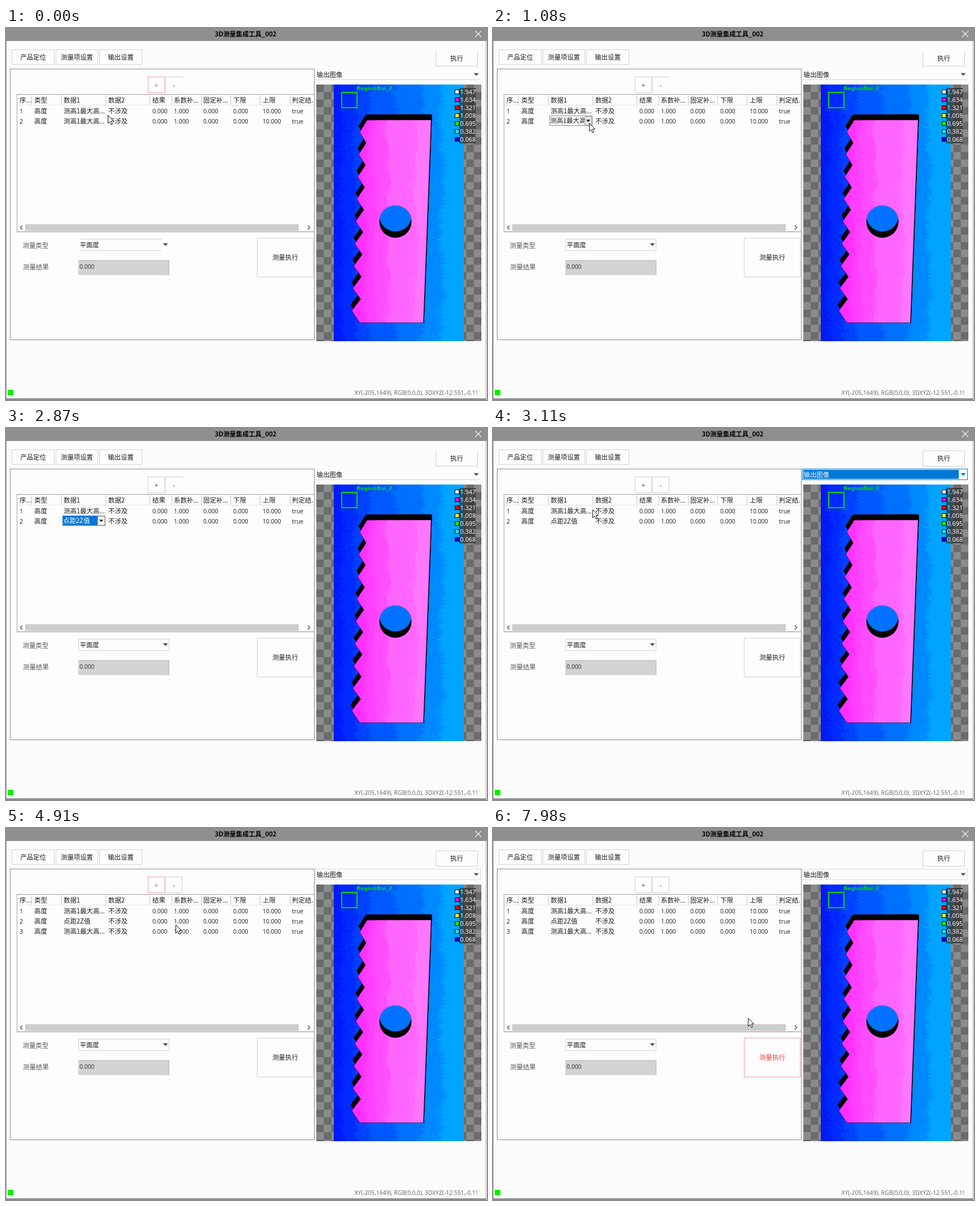
Write an HTML page with a canvas that moves like this. It is 851x658 px and loops after 8 s.

```html
<!DOCTYPE html>
<html lang="zh">
<head>
<meta charset="utf-8">
<style>
  html, body { margin: 0; width: 100%; height: 100%; overflow: hidden; background: #fcfcfc; }
  canvas { display: block; }
</style>
</head>
<body>
<canvas id="stage" width="851" height="658"></canvas>
<script>
const W = 851, H = 658, LOOP = 8000;
const CJK = '"Noto Sans CJK SC", "Noto Sans CJK", sans-serif';
const LATIN = '"Open Sans", "Noto Sans", sans-serif';
const INK = '#1c1c1c', BLUE = '#0078d7', RED = '#f23a3a', PINK = '#f2a3a3', EDGE = '#d2d2d2';
const stage = document.getElementById('stage').getContext('2d');

// Pointer stops: time, x, y; a stop without a place hides the pointer.
const pointerStops = [
  [0, 180, 154], [120, 178, 156], [270, 171, 160], [390, 165, 162], [510, 168, 163],
  [810, 170, 168], [1360, 167, 176], [1480, 160, 188], [1600, 157, 195], [1750],
  [2990, 166, 153], [3110, 176, 144], [3260, 198, 112], [3410, 240, 112],
  [3530, 265, 112], [3680, 268, 107], [3800, 271, 104], [3950, 272, 103],
  [4910, 300, 171], [5030, 327, 241], [5180, 352, 293], [5300, 378, 334],
  [5450, 425, 382], [5570, 462, 414], [5720, 477, 422], [5870, 494, 420],
  [6020, 497, 418], [6140, 498, 418], [7980, 451, 336]
];

const headers = ['序...', '类型', '数据1', '数据2', '结果', '系数补...', '固定补...', '下限', '上限', '判定结...'];
const columns = [24, 50, 102, 181, 259, 297, 349, 402, 454, 506];
const dividers = [45, 98, 176, 254, 293, 345, 397, 449, 502];

function seeded(seed) {
  return () => (seed = (seed * 16807) % 2147483647) / 2147483647;
}

function box(c, x, y, w, h, fill) {
  c.fillStyle = fill;
  c.fillRect(x, y, w, h);
}

function frame(c, x, y, w, h, color, fill) {
  if (fill) box(c, x, y, w, h, fill);
  c.strokeStyle = color;
  c.lineWidth = 1;
  c.strokeRect(x + .5, y + .5, w - 1, h - 1);
}

function clipped(c, x, y, w, h, paint) {
  c.save();
  c.beginPath();
  c.rect(x, y, w, h);
  c.clip();
  paint();
  c.restore();
}

function label(c, text, x, y, { color = INK, size = 11.4, align = 'left', weight = 400, family } = {}) {
  const latin = /^[\x20-\x7e]+$/.test(text);
  c.font = `${weight} ${latin ? size - 1 : size}px ${family || (latin ? LATIN : CJK)}`;
  c.textAlign = align;
  c.fillStyle = color;
  c.fillText(text, x, y + 4);
}

function polygon(c, points, dx = 0, dy = 0) {
  c.beginPath();
  points.forEach(([x, y]) => c.lineTo(x + dx, y + dy));
  c.closePath();
}

function disc(c, x, y, r) {
  c.beginPath();
  c.arc(x, y, r, 0, 2 * Math.PI);
}

function arrowDown(c, x, y, r, color) {
  polygon(c, [[x - r, y - r / 2], [x + r, y - r / 2], [x, y + r / 2 + .5]]);
  c.fillStyle = color;
  c.fill();
}

function chevron(c, x, y, dir) {
  c.strokeStyle = '#555';
  c.lineWidth = 1.4;
  c.beginPath();
  c.moveTo(x - 2 * dir, y - 3.5);
  c.lineTo(x + 1.5 * dir, y);
  c.lineTo(x - 2 * dir, y + 3.5);
  c.stroke();
}

function button(c, text, x, y, w, h, hot) {
  frame(c, x, y, w, h, hot ? PINK : EDGE, '#fdfdfd');
  label(c, text, x + w / 2, y + h / 2, { align: 'center', color: hot ? RED : INK });
}

// Vertical colour bands whose borders fray from row to row.
function bands(c, right, top, bottom, stops, fray, rnd) {
  for (let y = top; y < bottom; y++) {
    stops.forEach(([x, color], i) => {
      const sway = 3 * Math.sin(y / 31 + i * 2) + 2 * Math.sin(y / 9 + i);
      const left = i ? Math.round(x + sway + (rnd() - .5) * fray) : x;
      box(c, left, y, right - left, 1, color);
      if (i && rnd() < .5) box(c, Math.round(left - 4 - rnd() * fray), y, 1 + Math.round(rnd() * 2), 1, color);
    });
  }
}

function plateOutline() {
  const points = [[753, 163], [739, 521], [626, 521]];
  for (let i = 8; i >= 0; i--) {
    const y = 184 + i * 39.5;
    points.push([626 - i * 1.75, y], [639 - i * 1.42, y - 20.5]);
  }
  return points;
}

function drawPlate(c, rnd) {
  const plate = plateOutline();
  c.fillStyle = c.strokeStyle = '#000';
  polygon(c, plate, -2.5, -10.5);
  c.fill();
  box(c, 740, 153, 13.5, 12, '#000');
  c.lineWidth = 1;
  polygon(c, plate);
  c.stroke();
  c.save();
  c.clip();
  bands(c, 756, 160, 523, [[608, '#ff30ff'], [636, '#ff3eff'], [651, '#ff4cff'],
    [675, '#ff66ff'], [725, '#ff76ff']], 5, rnd);
  for (let i = 0; i < 30; i++)
    box(c, Math.round(630 + rnd() * 60), 165 + rnd() * 300, 1, 20 + rnd() * 100, 'rgba(255,60,255,.4)');
  c.restore();
  c.beginPath();
  c.moveTo(753, 154);
  c.lineTo(739, 521);
  c.lineWidth = 1.5;
  c.stroke();

  c.save();
  disc(c, 689, 342.5, 28.5);
  c.fillStyle = '#000';
  c.fill();
  c.clip();
  disc(c, 689, 331.5, 28.5);
  c.fillStyle = '#0072ff';
  c.fill();
  box(c, 659, 312, 60, 20, '#0072ff');
  c.restore();
}

function drawHeightMap(c) {
  const rnd = seeded(71), cell = 292 / 22;
  clipped(c, 549, 100, 292, 454, () => {
    for (let row = 0; row < 35; row++)
      for (let col = 0; col < 22; col++)
        box(c, 549 + col * cell, 100 + row * cell, cell + 1, cell + 1, (row + col) % 2 ? '#8b8b8b' : '#6b6b6b');
  });

  clipped(c, 580, 100, 230, 454, () => {
    bands(c, 810, 100, 554, [[580, '#0018fa'], [594, '#0028ff'], [618, '#0040ff'],
      [646, '#0058ff'], [690, '#0070ff'], [733, '#0088ff'], [771, '#00a4ff']], 12, rnd);
    drawPlate(c, rnd);
  });

  c.strokeStyle = '#00dc14';
  c.lineWidth = 2;
  c.strokeRect(594, 114, 27, 27);
  label(c, 'RegionRoi_2', 620, 105.5, { color: '#00dc14', size: 10.2, weight: 700, family: '"DejaVu Sans", sans-serif' });

  box(c, 802, 106, 29, 98, 'rgba(40,40,40,.65)');
  const scale = [['1.947', '#fff'], ['1.634', '#f0f'], ['1.321', '#f00'], ['1.008', '#ff0'],
    ['0.695', '#0f0'], ['0.382', '#0ff'], ['0.068', '#00f']];
  scale.forEach(([text, color], i) => {
    const y = 113 + i * 14;
    frame(c, 794, y - 4, 8, 8, '#000', color);
    label(c, text, 803.5, y, { color: '#fff', size: 11.8 });
  });
}

function drawBackdrop(c) {
  box(c, 0, 0, W, H, '#fcfcfc');
  box(c, 0, 0, W, 23, '#8f8f8f');
  box(c, 0, 23, 1, 635, '#999');
  box(c, 849, 23, 1, 635, '#999');
  box(c, 0, 655, 850, 3, '#8f8f8f');
  label(c, '3D测量集成工具_002', 424, 11, { align: 'center', weight: 700, size: 11.3, color: '#000' });
  c.strokeStyle = '#eee';
  c.lineWidth = 1.1;
  c.beginPath();
  c.moveTo(830, 5); c.lineTo(841, 16);
  c.moveTo(841, 5); c.lineTo(830, 16);
  c.stroke();

  button(c, '产品定位', 10, 38, 76, 27);
  button(c, '测量项设置', 88, 38, 75, 27);
  button(c, '输出设置', 165, 38, 76, 27);

  frame(c, 7, 72, 539, 480, '#8c8c8c', '#fdfdfd');
  box(c, 19, 117, 526, 1, '#999');
  box(c, 19, 117, 1, 244, '#a5a5a5');
  box(c, 19, 360, 526, 1, '#8c8c8c');
  box(c, 20, 136, 525, 1, '#e2e2e2');
  dividers.forEach(x => box(c, x, 119, 1, 17, '#c4c4c4'));
  clipped(c, 19, 117, 524, 25, () =>
    headers.forEach((text, i) => label(c, text, columns[i], 128.3)));
  box(c, 34, 347, 484, 12, '#cdcdcd');
  chevron(c, 27, 353, -1);
  chevron(c, 536, 353, 1);

  label(c, '测量类型', 29.5, 385, { color: '#555' });
  label(c, '测量结果', 30, 423, { color: '#555' });
  box(c, 128, 411, 160, 26, '#d3d3d3');
  box(c, 128, 411, 160, 1, '#b0b0b0');
  box(c, 288, 411, 1, 27, '#b8b8b8');
  label(c, '0.000', 130, 421.5, { color: '#333' });

  box(c, 3, 640, 10, 10, '#00f000');
  clipped(c, 610, 636, 224, 18, () =>
    label(c, 'XY(-205,1649), RGB(0,0,0), 3DXYZ(-12.551,-0.19', 616.5, 645, { color: '#666', size: 11.3 }));
  drawHeightMap(c);
}

function drawRow(c, index, source) {
  const y = 147 + index * 18;
  const cells = [`${index + 1}`, '高度', source, '不涉及', '0.000', '1.000', '0.000', '0.000', '10.000', 'true'];
  cells.forEach((text, i) => label(c, text, columns[i], y));
}

function drawCellEditor(c, text, selected) {
  frame(c, 100, 155, 76, 18, '#8a8a8a', '#fff');
  if (selected) box(c, 100, 155, 62, 17, BLUE);
  clipped(c, 100, 155, 62, 18, () =>
    label(c, text, 101, 164, { color: selected ? '#fff' : INK }));
  frame(c, 162, 156, 13, 16, '#b5b5b5', selected ? '#fff' : '#e6e6e6');
  arrowDown(c, 168.5, 164, 3.5, '#000');
}

function drawTypeBox(c, whole) {
  if (whole) frame(c, 128, 373, 161, 21, EDGE);
  else {
    box(c, 132, 373, 143, 1, EDGE);
    box(c, 132, 393, 143, 1, EDGE);
  }
  label(c, '平面度', 130.5, 384);
  arrowDown(c, 282, 383, 4.5, '#555');
}

function drawOutputBox(c, focused, whole) {
  if (focused) {
    frame(c, 547, 72, 293, 20, BLUE, '#fff');
    box(c, 549, 74, 275, 16, BLUE);
  } else if (whole) frame(c, 547, 72, 293, 20, '#dcdcdc');
  else box(c, 547, 91, 293, 1, '#d6d6d6');
  label(c, '输出图像', 549.5, 82.5, { color: focused ? '#fff' : INK });
  arrowDown(c, 832, 82, 4.5, focused ? BLUE : '#555');
}

function drawPointer(c, x, y) {
  polygon(c, [[0, 0], [0, 14], [3.2, 11.2], [5.6, 16.5], [8, 15.4], [5.7, 10.3], [10, 10]], x + .5, y + .5);
  c.fillStyle = '#fff';
  c.fill();
  c.strokeStyle = '#111';
  c.lineWidth = 1;
  c.stroke();
}

const backdrop = document.createElement('canvas');
backdrop.width = W;
backdrop.height = H;
drawBackdrop(backdrop.getContext('2d'));

function draw(t) {
  const c = stage, within = (from, to) => t >= from && t < to;
  c.drawImage(backdrop, 0, 0);

  const redrawn = t >= 2990;
  button(c, '执行', 760, 40, 75, 28);
  if (!redrawn) box(c, 761, 40, 73, 1, '#fcfcfc');
  button(c, '+', 251, 86, 30, 29, t < 660 || within(3530, 6020));
  button(c, '-', 282, 86, 30, 29);
  if (!redrawn) {
    box(c, 311, 89, 1, 23, '#fdfdfd');
    box(c, 283, 114, 28, 1, '#fdfdfd');
  }
  button(c, '测量执行', 444, 371, 100, 70, t >= 5570);

  const tall = '测高1最大高...';
  drawRow(c, 0, tall);
  drawRow(c, 1, t < 2870 ? tall : '点距2Z值');
  if (t >= 4230) drawRow(c, 2, tall);
  if (within(660, 2990)) drawCellEditor(c, t < 2870 ? '测高1最大高' : '点距2Z值', !within(1080, 2870));

  drawTypeBox(c, t >= 810);
  drawOutputBox(c, within(2990, 4230), t >= 4230);

  const [, x, y] = pointerStops.filter(stop => stop[0] <= t).pop();
  if (x !== undefined) drawPointer(c, x, y);
}

const start = performance.now();
function tick() {
  draw((performance.now() - start) % LOOP);
  requestAnimationFrame(tick);
}
tick();
</script>
</body>
</html>
```
